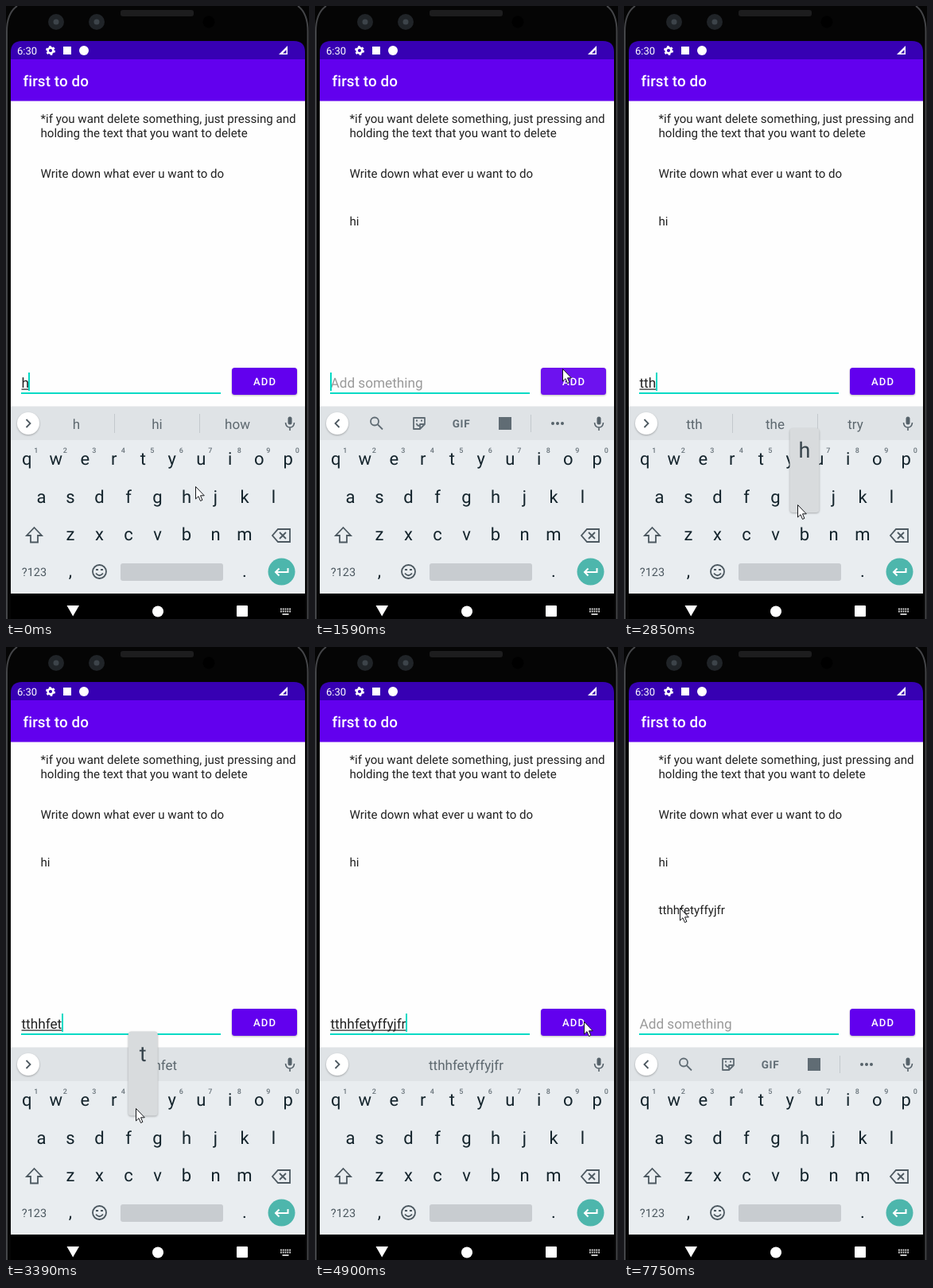
Animation, 381 px wide and 771 px high, one loop 8000 ms. Source, as an HTML page:

```html
<!DOCTYPE html>
<html lang="en">
<head>
<meta charset="utf-8">
<title>To-do app</title>
<style>
  html, body { margin: 0; width: 100%; height: 100%; overflow: hidden; background: #000; }
  svg { display: block; width: 381px; height: 771px; font-family: Roboto, sans-serif; text-rendering: geometricPrecision; }
  .mid text, text.mid { text-anchor: middle; }
  .item { font-size: 15.1px; fill: #212121; }
  .field { font-size: 17.2px; }
  .word { font-size: 17px; fill: #5d686f; }
  .key { font-size: 22px; fill: #14242c; }
  .hint { font-size: 9px; font-weight: 500; fill: #68737a; }
  .line { fill: none; stroke: #4c5860; stroke-width: 1.8; }
  #tools .line { stroke: #606c74; }
  .soft { filter: drop-shadow(0 1px 1px rgba(0, 0, 0, .28)); }
</style>
</head>
<body>
<svg viewBox="0 0 381 771">
  <!-- phone body -->
  <rect width="381" height="771" fill="#050505"/>
  <path d="M14 0Q1 9 1 32V771M367 0Q379.5 9 379.5 32V771" fill="none" stroke="#444548" stroke-width="2"/>
  <g fill="#202428">
    <circle cx="63" cy="20" r="10"/><circle cx="114" cy="20" r="10"/>
  </g>
  <g fill="#3d444a"><circle cx="63" cy="20" r="3.5"/><circle cx="114" cy="20" r="3.5"/></g>
  <rect x="144" y="5" width="92" height="8" rx="3" fill="#1d1d1e"/>
  <circle cx="255" cy="20" r="7.5" fill="#000"/>

  <!-- app -->
  <rect x="6" y="119" width="370" height="385" fill="#fefefe"/>
  <path d="M6 67V58Q6 44 20 44H362Q376 44 376 58V67Z" fill="#3700b3"/>
  <rect x="6" y="67" width="370" height="52.5" fill="#6200ee"/>
  <g fill="#fff">
    <text x="14" y="60.5" font-size="13">6:30</text>
    <circle cx="56" cy="56" r="3.4" fill="none" stroke="#fff" stroke-width="2.6"/>
    <circle cx="56" cy="56" r="5" fill="none" stroke="#fff" stroke-width="2" stroke-dasharray="2.6 2.636"/>
    <rect x="72" y="51" width="10" height="10"/>
    <circle cx="98" cy="56" r="6"/>
    <path d="M354 50V61H343Z"/>
    <path d="M352.5 55V59.5H348Z" fill="#3700b3"/>
    <text x="21.5" y="100.5" font-size="18.8" font-weight="500" letter-spacing=".1">first to do</text>
  </g>
  <g class="item">
    <text x="43.5" y="147">*if you want delete something, just pressing and</text>
    <text x="43.5" y="164.5">holding the text that you want to delete</text>
    <text x="43.5" y="216">Write down what ever u want to do</text>
    <text id="item1" x="43.5" y="276">hi</text>
    <text id="item2" x="43.5" y="336">tthhfetyffyjfr</text>
  </g>
  <text id="tip" class="field" x="19.5" y="479.5" fill="#9a9a9a">Add something</text>
  <text id="typed" class="field" x="19.5" y="479.5" fill="#212121"></text>
  <rect id="under" x="19.5" y="481.5" height="1.2" fill="#212121"/>
  <rect x="19" y="486" width="251" height="2" fill="#03dac5"/>
  <rect id="caret" y="461" width="2" height="23" fill="#03dac5"/>
  <rect class="soft" x="284" y="455" width="82" height="34" rx="3.5" fill="#6200ee"/>
  <rect id="ripple" x="284" y="455" width="82" height="34" rx="3.5" fill="#fff"/>
  <text x="311" y="477" font-size="13.1" font-weight="500" letter-spacing="1.15" fill="#fff">ADD</text>

  <!-- keyboard -->
  <rect x="6" y="503.5" width="370" height="43" fill="#dfe3e6"/>
  <rect x="6" y="546" width="370" height="193" fill="#e9edf0"/>
  <circle class="soft" cx="28" cy="525" r="14" fill="#fff"/>
  <path id="chevron" class="line" d="M-2.5-5L2.5 0L-2.5 5"/>
  <rect x="354.5" y="516.5" width="5" height="10" rx="2.5" fill="#56626a"/>
  <path d="M351.5 524Q352 530 357 530T362.5 524M357 530V534" fill="none" stroke="#56626a" stroke-width="1.6"/>
  <g id="words" class="mid">
    <path id="bars" d="M136.5 513V537M243.5 513V537" stroke="#c3c9cd"/>
    <text class="word" x="88.5" y="531.5"></text>
    <text class="word" x="190" y="531.5"></text>
    <text class="word" x="291" y="531.5"></text>
  </g>
  <g id="tools">
    <circle class="line" cx="75" cy="522.5" r="5"/><path class="line" d="M79 526.5L85 532.5"/>
    <path class="line" d="M138 526V518H124V532H132L138 526H132V532" stroke-linejoin="round"/>
    <path class="line" d="M127.5 525Q128.5 528 131 528M127 521.5h2M133 521.5h2"/>
    <text class="mid" x="184" y="529.5" font-size="13.5" font-weight="700" letter-spacing=".6" fill="#606c74">GIF</text>
    <rect x="231" y="517" width="16" height="16" fill="#606c74"/>
    <path d="M271.5 514V536" stroke="#c3c9cd"/>
    <path d="M299 525h13" stroke="#56626a" stroke-width="4" stroke-linecap="round" stroke-dasharray="0 6"/>
  </g>
  <g id="keys" class="mid">
    <text x="35.5" y="717" font-size="14.5" fill="#4c5860">?123</text>
    <text class="key" x="81" y="718">,</text>
    <text class="key" x="300" y="718">.</text>
  </g>
  <path class="line" d="M35.5 656L45 666H40V674.5H31V666H26Z"/>
  <path class="line" d="M342 658H357V674H342L335 666ZM344 662L352 670M352 662L344 670"/>
  <circle class="line" cx="117.5" cy="711.5" r="8.5"/>
  <path class="line" d="M113 713.5Q117.5 719 122 713.5M113 709h3M119 709h3"/>
  <rect x="144" y="701" width="129" height="22" rx="3" fill="#c8ccd0"/>
  <circle cx="346.5" cy="711.5" r="17" fill="#4db6ac"/>
  <path d="M354.5 707V712H339M343.5 707.5L339 712L343.5 716.5" fill="none" stroke="#fff" stroke-width="2"/>

  <!-- navigation bar -->
  <rect x="6" y="739" width="370" height="32" fill="#000"/>
  <g fill="#fff">
    <path d="M76.5 754H92L84.2 767.5Z"/>
    <circle cx="191" cy="761.5" r="7"/>
    <rect x="290" y="754" width="14" height="14" rx="1"/>
    <path d="M345 758.5H358M345 761.5H358" stroke="#ddd" stroke-width="1.8" stroke-dasharray="1.8 1"/>
    <path d="M347.5 765H355.5" stroke="#ddd" stroke-width="1.8"/>
  </g>

  <g id="popup">
    <rect class="soft" x="-18.5" y="-86" width="37" height="106" rx="4" fill="#d8dbdd"/>
    <text class="mid" y="-49" font-size="27" fill="#37444c"></text>
  </g>
  <path id="mouse" d="M.5.5V16L4 12.7L6.5 18.5L8.9 17.4L6.5 11.8H11.3Z" fill="#fff" stroke="#16181c"/>
</svg>
<script>
  const LOOP = 8000, PITCH = 36.5, FIELD = 19.5;
  const $ = id => document.getElementById(id);

  // Letter rows, each centred on the keyboard
  const spots = {};
  function addText(cls, x, y, str) {
    const el = document.createElementNS('http://www.w3.org/2000/svg', 'text');
    el.setAttribute('class', cls);
    el.setAttribute('x', x);
    el.setAttribute('y', y);
    el.textContent = str;
    $('keys').append(el);
  }
  ['qwertyuiop', 'asdfghjkl', 'zxcvbnm'].forEach((row, r) => {
    [...row].forEach((ch, i) => {
      const x = 190.5 + (i - (row.length - 1) / 2) * PITCH;
      const y = 569.5 + r * 47.5;
      spots[ch] = [x, y];
      addText('key', x, y + 7.5, ch);
      if (!r) addText('hint', x + 11.5, 562, (i + 1) % 10);
    });
  });

  // Presses in steady bursts; "+" is the ADD button
  const burst = (str, from, gap = 0) => [...str].map((key, i) => ({ key, at: from + i * gap }));
  const presses = [
    burst('h', -130), burst('i', 560), burst('+', 1400),
    burst('tth', 2280, 280), burst('hfetyffy', 2990, 132), burst('jfr', 4170, 215),
    burst('+', 5245)
  ].flat();

  // The mouse visits every pressed key, and a few places in between
  const rests = [[0, 238, 604], [1050, 306, 432], [1590, 311, 456], [2130, 172, 569], [4050, 256, 592],
    [4900, 338, 471], [5470, 353, 469], [5725, 15, 314], [5860, 75, 328], [6050, 75, 328],
    [6230, 113, 330], [6810, 113, 330], [7100, 136, 331], [7750, 70, 328], [LOOP, 70, 328]];
  const visits = presses.filter(p => p.at > 0 && spots[p.key])
    .map(({ key, at }) => [at, spots[key][0] - 9, spots[key][1] + 10]);
  const stops = [...rests, ...visits].sort((a, b) => a[0] - b[0]);

  function mouseAt(t) {
    const i = stops.findIndex(s => s[0] > t);
    const [a, ax, ay] = stops[i - 1], [b, bx, by] = stops[i];
    const k = (t - a) / (b - a), e = k * k * (3 - 2 * k);
    return [ax + (bx - ax) * e, ay + (by - ay) * e];
  }

  const guesses = { h: 'h hi how', hi: 'his hi him', t: 't the to', tt: 'tt the to', tth: 'tth the try' };
  const words = [...$('words').querySelectorAll('text')];
  const show = (id, on) => $(id).style.display = on ? '' : 'none';
  const move = (id, x, y) => $(id).setAttribute('transform', `translate(${x} ${y})`);

  function draw(t) {
    const done = presses.filter(p => p.at <= t);
    const last = done[done.length - 1];
    const log = done.map(p => p.key).join('').split('+');
    const added = log.length - 1, text = log[added];
    const age = t - last.at;

    show('item1', added > 0);
    show('item2', added > 1);
    show('tip', !text);
    $('typed').textContent = text;
    const width = text ? $('typed').getComputedTextLength() : 0;
    $('under').setAttribute('width', width);
    $('caret').setAttribute('x', Math.round(FIELD - .5 + width));
    show('caret', age % 1000 < 500);

    show('words', text);
    show('tools', !text);
    $('chevron').setAttribute('transform', `translate(28 525) scale(${text ? 1 : -1} 1)`);
    const guess = guesses[text];
    show('bars', guess);
    const list = guess ? guess.split(' ') : ['', text, ''];
    words.forEach((el, i) => el.textContent = list[i]);

    $('ripple').setAttribute('opacity', text ? 0 : Math.max(0, .12 * (1 - age / 450)));

    const spot = age < 130 && spots[last.key];
    show('popup', spot);
    if (spot) {
      move('popup', ...spot);
      $('popup').lastElementChild.textContent = last.key;
    }
    move('mouse', ...mouseAt(t).map(Math.round));
  }

  const start = performance.now();
  function frame() {
    draw(Math.max(0, performance.now() - start) % LOOP);
    requestAnimationFrame(frame);
  }
  frame();
</script>
</body>
</html>
```
